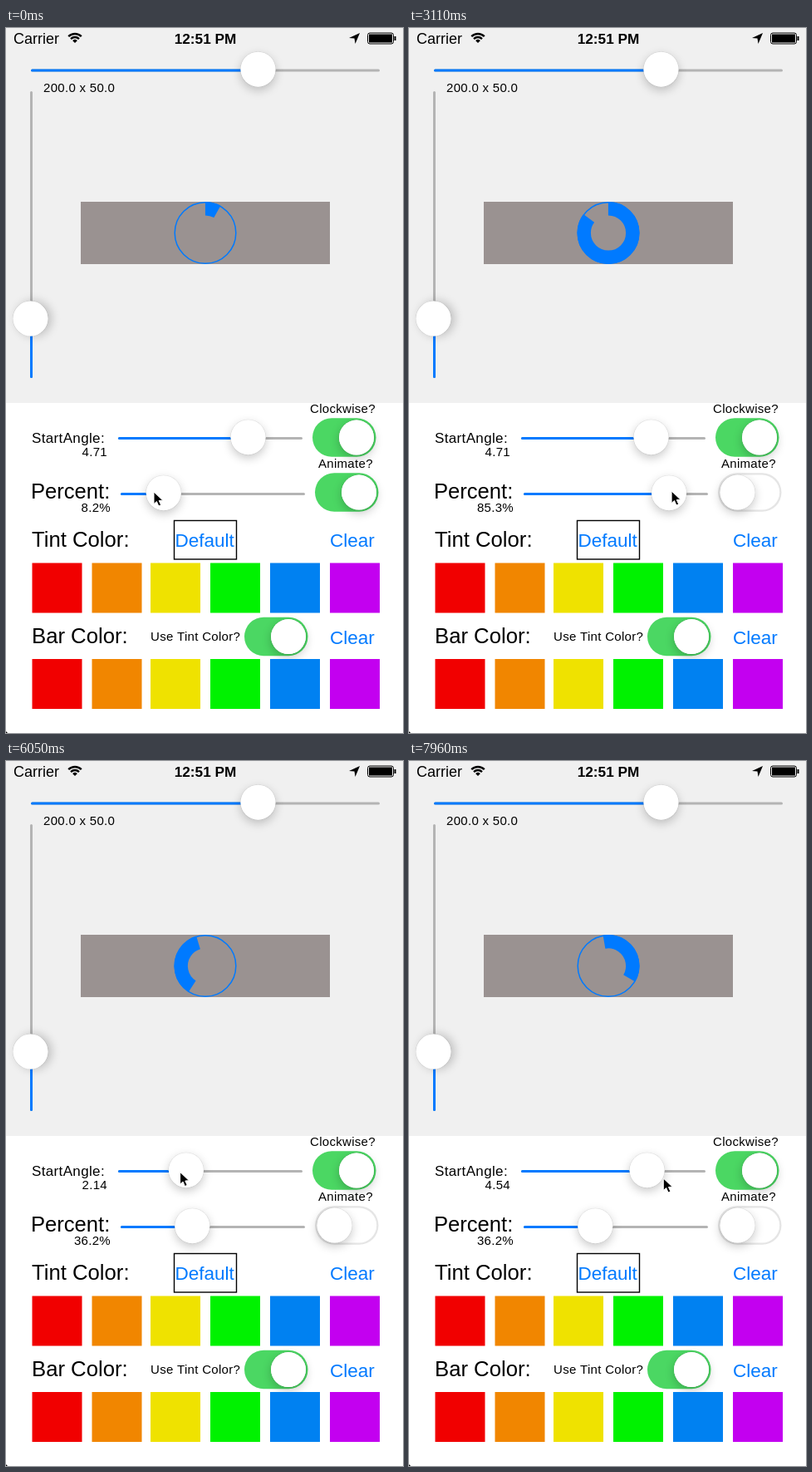
Write an HTML page with a canvas that moves like this. It is 478 by 848 pixels and loops after 8000 ms.

```html
<!DOCTYPE html>
<html lang="en">
<head>
<meta charset="utf-8">
<title>Circular progress demo</title>
<style>
html, body { margin: 0; width: 100%; height: 100%; overflow: hidden; background: #fff }
canvas { display: block }
</style>
</head>
<body>
<canvas id="stage" width="478" height="848"></canvas>
<script>
const ctx = document.getElementById('stage').getContext('2d');
const LOOP = 8000, STEP = 147.4;
const BLUE = '#007aff', GREY = '#b4b4b4', GREEN = '#4bd763', TAU = Math.PI * 2;
const COLORS = ['#f10000', '#f18600', '#efe200', '#00f200', '#0081f1', '#c300f0'];

// Progress of n from a to b, clamped to 0..1.
const ramp = (n, a, b) => Math.min(1, Math.max(0, (n - a) / (b - a)));

const percentAt = n =>
  8.2 + 89.2 * ramp(n, 0, 5) - 72.7 * ramp(n, 20, 26) + 11.5 * ramp(n, 26, 30);

// The label trails the first, fast drag by half a step.
const thumbAt = n => percentAt(n < 20 ? n + .5 : n);

// While "Animate?" is on, the ring lags behind the slider.
const ringAt = n => n < 20 ? 8.2 + 89.2 * ramp(n, 0, 8) ** 1.4 : percentAt(n);

const angleAt = n => 4.71 - 4.4 * ramp(n, 34, 46) + 4.23 * ramp(n, 47, 54);

function cursorAt(n) {
  const toPercent = ramp(n, 0, 5), toSwitch = ramp(n, 13, 16), back = ramp(n, 18, 20);
  const toAngle = ramp(n, 31, 34), left = ramp(n, 34, 46), right = ramp(n, 47, 54);
  const drag = 1.809 * (percentAt(Math.max(n, 20)) - percentAt(20));
  return [
    178 + 175 * toPercent + 45 * toSwitch - 60 * back + drag + 71 * toAngle - 152 * left + 160 * right,
    558 + 4 * toPercent - 2 * toSwitch - 3 * back - 59 * toAngle - 6 * left + 10 * right
  ];
}

function rect(x, y, w, h, color) {
  ctx.fillStyle = color;
  ctx.fillRect(x, y, w, h);
}

function pill(x, y, w, h, color) {
  ctx.beginPath();
  ctx.roundRect(x, y, w, h, Math.min(w, h) / 2);
  ctx.fillStyle = color;
  ctx.fill();
}

function shape(points, color) {
  ctx.beginPath();
  points.forEach(([x, y]) => ctx.lineTo(x, y));
  ctx.closePath();
  ctx.fillStyle = color;
  ctx.fill();
}

function arc(x, y, r, from, to, width, color) {
  ctx.beginPath();
  ctx.arc(x, y, r, from, to);
  ctx.lineWidth = width;
  ctx.strokeStyle = color;
  ctx.stroke();
}

function text(str, x, y, size, { color = '#000', align = 'left', weight = 'normal', spacing = 0 } = {}) {
  ctx.font = `${weight} ${size}px "Liberation Sans", Arial, sans-serif`;
  ctx.letterSpacing = spacing + 'px';
  ctx.textAlign = align;
  ctx.fillStyle = color;
  ctx.fillText(str, x, y);
}

const small = (str, x, y, align) => text(str, x, y, 15, { align, spacing: .3 });
const title = (str, x, y) => text(str, x, y, 25.7);
const button = (str, x, y) => text(str, x, y, 22.5, { color: BLUE });

function knob(cx, cy, width = 42, dx = 0, dy = 4) {
  const x = cx - width / 2, y = cy - 21;
  ctx.save();
  ctx.shadowColor = 'rgba(0,0,0,.22)';
  ctx.shadowBlur = 12;
  ctx.shadowOffsetX = dx;
  ctx.shadowOffsetY = dy;
  pill(x, y, width, 42, '#fff');
  ctx.restore();
  pill(x - .5, y - .5, width + 1, 43, 'rgba(0,0,0,.1)');
  pill(x, y, width, 42, '#fff');
}

function slider(x1, x2, y, thumb) {
  pill(x1, y - 1.5, x2 - x1, 3, GREY);
  pill(x1, y - 1.5, thumb - x1, 3, BLUE);
  knob(thumb, y - 1.3);
}

function toggle(x, y, state = 'on') {
  const w = 76.5, h = 46.5, cy = y + h / 2;
  if (state === 'off') {
    pill(x, y, w, h, '#e5e5e5');
    pill(x + 2.3, y + 2.3, w - 4.6, h - 4.6, '#fff');
    knob(x + 23.5, cy);
  } else if (state === 'pressed') {
    pill(x, y, w, h, '#66d87a');
    knob(x + 48.5, cy, 47);
  } else {
    pill(x, y, w, h, GREEN);
    knob(x + 53, cy);
  }
}

function statusBar() {
  text('Carrier', 9, 19, 18);
  text('12:51 PM', 240, 19, 17.2, { align: 'center', weight: 'bold' });
  const from = -Math.PI * .75, to = -Math.PI * .25;
  arc(83, 18, 11, from, to, 2.4, '#000');
  arc(83, 18, 7, from, to, 2.4, '#000');
  arc(83, 18, 2, from, to, 4, '#000');
  shape([[426, 6], [420.5, 19], [419.5, 12.5], [413, 12]], '#000');
  ctx.beginPath();
  ctx.roundRect(435.5, 6, 31, 13, 2.5);
  ctx.lineWidth = 1;
  ctx.stroke();
  rect(437, 7.5, 28, 10, '#000');
  rect(467.5, 10, 2, 5, '#000');
}

function cursor(x, y) {
  ctx.save();
  ctx.translate(x, y);
  shape([[0, 0], [0, 14.5], [3.4, 11.5], [5.8, 17], [8.6, 15.8], [6.2, 10.5], [10.8, 10.2]], '#000');
  ctx.lineWidth = 1;
  ctx.lineJoin = 'round';
  ctx.strokeStyle = '#fff';
  ctx.stroke();
  ctx.restore();
}

function ring(percent, start) {
  arc(240, 246.5, 36.8, 0, TAU, 1.5, BLUE);
  arc(240, 246.5, 29.3, start, start + TAU * percent / 100, 16.4, BLUE);
}

function swatches(y) {
  COLORS.forEach((color, i) => rect(30 + 72 * i + (i < 2 ? 1.5 : 0), y, 60, 60, color));
}

function draw(n) {
  const angle = angleAt(n);

  rect(0, 0, 478, 848, '#fff');
  rect(0, 0, 478, 451, '#f0f0f0');
  statusBar();

  slider(30, 450, 51, 303.5);
  pill(29, 76, 3, 345, GREY);
  pill(29, 350, 3, 71, BLUE);
  knob(29.5, 349.5, 42, 4, 0);
  small('200.0 x 50.0', 45, 77);

  rect(90, 209, 300, 75, '#9a9291');
  ring(ringAt(n), angle);

  text('StartAngle:', 31, 499, 17, { spacing: .35 });
  small(angle.toFixed(2), 122, 515, 'right');
  slider(135, 357, 493.5, 154.5 + angle * 29.1);
  toggle(369, 469.3);
  small('Clockwise?', 366, 463);

  text('Percent:', 30, 565.5, 25.6);
  small(percentAt(n).toFixed(1) + '%', 126, 582, 'right');
  slider(138, 360, 560.5, 158.8 + thumbAt(n) * 1.809);
  toggle(372, 535.3, n < 16 ? 'on' : n < 17 ? 'pressed' : 'off');
  small('Animate?', 376, 529);

  title('Tint Color:', 31, 624);
  ctx.lineWidth = 1.4;
  ctx.strokeStyle = '#000';
  ctx.strokeRect(202.5, 592.5, 75, 46.5);
  button('Default', 203.5, 624);
  button('Clear', 390, 624);
  swatches(643.5);

  title('Bar Color:', 31, 739.5);
  small('Use Tint Color?', 174, 736.5);
  toggle(287, 708.8);
  button('Clear', 390, 741);
  swatches(759);

  shape([[0, 846], [2, 848], [0, 848]], '#000');
  cursor(...cursorAt(n));
}

function frame() {
  draw(Math.floor(performance.now() % LOOP / STEP));
  requestAnimationFrame(frame);
}
frame();
</script>
</body>
</html>
```
